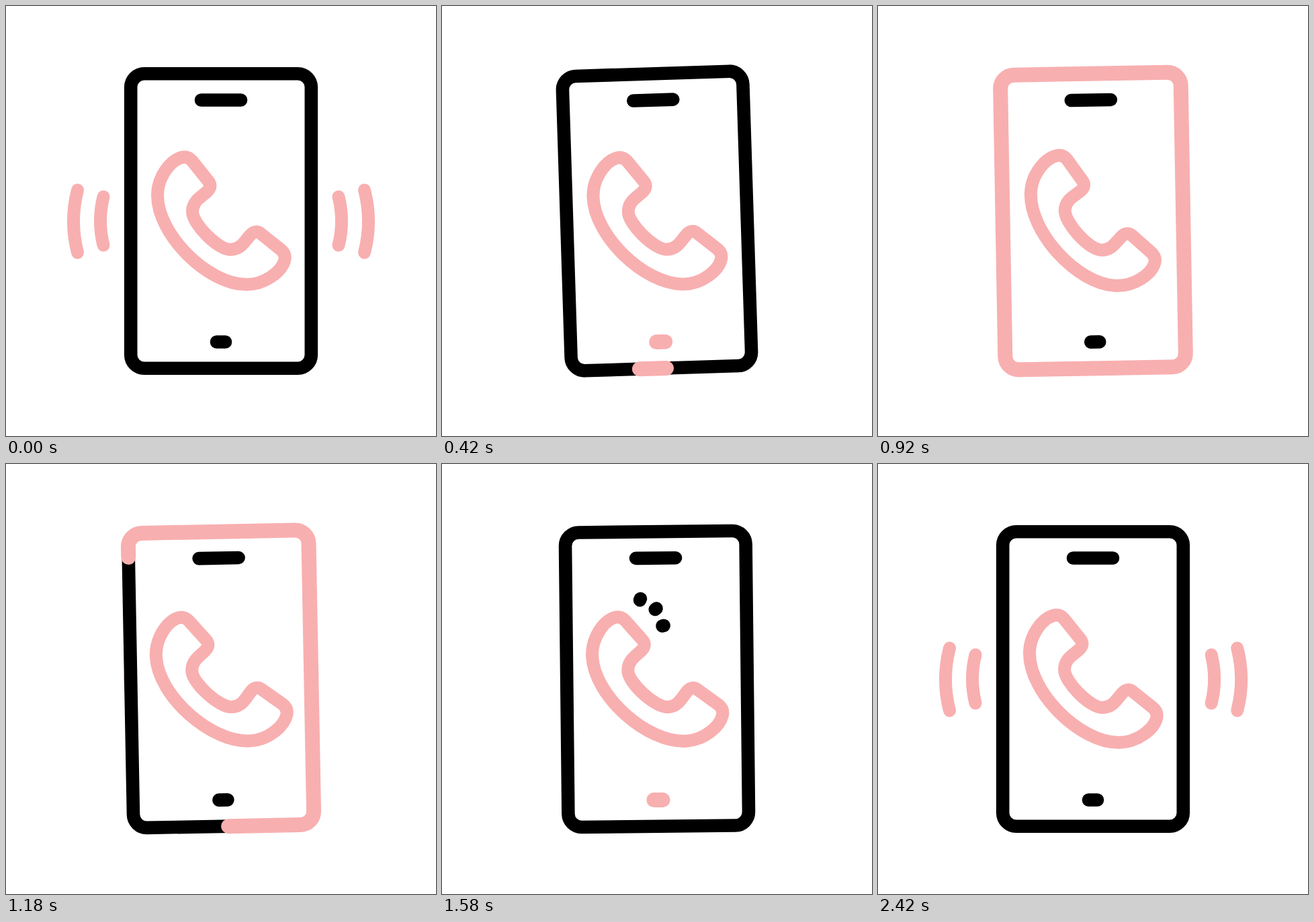
An HTML page that plays this animation: 640 by 640 pixels, repeating every 2600 ms.

```html
<!DOCTYPE html>
<html lang="en">
<head>
<meta charset="utf-8">
<title>Ringing phone</title>
<style>
  html, body { margin: 0; width: 100%; height: 100%; overflow: hidden; background: #fff; }
  svg { display: block; width: 100vw; height: 100vh; }
  path { fill: none; stroke-width: 19.6; stroke-linecap: round; stroke-linejoin: round; }
  .ink path { stroke: #000; }
  .pink path, path.pink { stroke: #f8afb0; }
  .wave, path.pink { stroke-width: 19; }
  path.over { stroke-width: 22; }
</style>
</head>
<body>
<svg viewBox="0 0 640 640">
  <g class="pink">
    <path class="wave" data-side="-1" data-hide="85" d="M106.500 274Q94.500 320.500 106.500 367"/>
    <path class="wave" data-side="-1" data-hide="45" d="M145 284Q136 320 145 356"/>
    <path class="wave" data-side="1" data-hide="85" d="M533.500 274Q545.500 320.500 533.500 367"/>
    <path class="wave" data-side="1" data-hide="45" d="M495 284Q504 320 495 356"/>
  </g>
  <g id="phone" class="ink">
    <path style="fill:#fff" d="M205.700 100.700H434.300a20 20 0 0 1 20 20V519.300a20 20 0 0 1-20 20H205.700a20 20 0 0 1-20-20V120.700a20 20 0 0 1 20-20Z"/>
    <path d="M290.500 140H349.500M313.500 500H326.500"/>
  </g>
  <g id="glow" class="pink">
    <path id="flow" class="over" pathLength="1000" d="M327 539.300H205.700a20 20 0 0 1-20-20V120.700a20 20 0 0 1 20-20H434.300a20 20 0 0 1 20 20V519.300a20 20 0 0 1-20 20H327"/>
    <path id="button" class="over" d="M313.500 500H326.500"/>
  </g>
  <g id="handset">
    <path class="pink" d="M277 230.500L301 260.500Q307.500 268.500 299.500 276C290.500 284.500 277.500 290 277.500 306C277.500 324 315 362.500 334 362.500C350 362.500 355.500 349.500 364 340.500Q371.500 332.500 379.500 339L409.500 363Q417 369.500 414.500 379C410 395 386 414.500 358 414.500C300 414.500 225.500 340 225.500 282C225.500 254 245 230 261 225.500Q270.500 223 277 230.500Z"/>
    <g id="dashes" class="ink"><path/><path/><path/></g>
  </g>
</svg>
<script>
  const LOOP = 2600;
  const $ = id => document.getElementById(id);
  const waves = [...document.querySelectorAll('.wave')];
  const dashes = [...$('dashes').children];

  // x1, y1, x2, y2 of each sound dash, in handset space
  const dashLines = [
    [300.5, 201.5, 310.5, 181],
    [322.5, 216.5, 341, 203],
    [332, 241.5, 353, 238]
  ];
  // time, angle
  const phoneSwing = [[0, 0], [100, -2.4], [280, 2.4], [460, -2.4], [650, 2.4], [850, -2.4],
    [1050, 2.4], [1250, -2.4], [1440, 2.4], [1680, -2.4], [1860, 0]];
  const handsetSwing = [[120, 0], [260, 5], [550, -5], [840, 5], [1110, -5],
    [1390, 5], [1660, -5], [2000, 5], [2140, 0]];

  const part = (t, a, b) => Math.min(1, Math.max(0, (t - a) / (b - a)));
  const ease = (t, a, b) => { const u = part(t, a, b); return u * u * (3 - 2 * u); };
  const mix = (a, b, u) => a + (b - a) * u;
  const within = (t, a, b) => t >= a && t < b;
  const show = (el, on) => { el.style.display = on ? '' : 'none'; };

  function track(keys, t) {
    const i = keys.findIndex(k => k[0] > t);
    if (i === 0) return keys[0][1];
    if (i < 0) return keys[keys.length - 1][1];
    const [t0, a] = keys[i - 1], [t1, b] = keys[i];
    return mix(a, b, ease(t, t0, t1));
  }

  // Outward travel: 0 is behind the phone, 1 at rest, 2 gone
  function waveStep(t) {
    if (t < 400) return 1 + ease(t, 0, 400);
    if (within(t, 480, 900)) return 2 * part(t, 480, 900);
    if (within(t, 1180, 1560)) return 2 * part(t, 1180, 1560);
    if (t >= 1870) return ease(t, 1870, 2300);
    return 2;
  }

  function drawWaves(t) {
    const step = waveStep(t);
    for (const w of waves) {
      const side = +w.dataset.side;
      let out = step < 1 ? -w.dataset.hide * (1 - step) : 60 * (step - 1);
      if (side > 0) out += 1.2 * ease(t, 2100, 2400);
      w.setAttribute('transform', `translate(${side * out} 0)`);
      w.style.opacity = Math.min(1, 2 - step);
      show(w, step < 2);
    }
  }

  function drawFlow(t) {
    const from = 1000 * ease(t, 960, 1480), to = 1000 * ease(t, 368, 888);
    show($('flow'), to > from);
    $('flow').setAttribute('stroke-dasharray', `0 ${from} ${to - from} 2000`);
    show($('button'), within(t, 340, 560) || within(t, 1480, 1700));
  }

  function drawDashes(t) {
    const from = ease(t, 1600, 2080), to = ease(t, 1525, 1805);
    show($('dashes'), within(t, 1550, 2200));
    dashLines.forEach(([x1, y1, x2, y2], i) => {
      const at = u => `${mix(x1, x2, u)} ${mix(y1, y2, u)}`;
      dashes[i].setAttribute('d', `M${at(from)}L${at(to)}`);
    });
  }

  function turn(el, angle) {
    el.setAttribute('transform', `rotate(${angle} 320 320)`);
  }

  function draw(t) {
    const tilt = track(phoneSwing, t);
    turn($('phone'), tilt);
    turn($('glow'), tilt);
    turn($('handset'), track(handsetSwing, t));
    drawWaves(t);
    drawFlow(t);
    drawDashes(t);
  }

  const start = performance.now();
  function tick() {
    draw((performance.now() - start) % LOOP);
    requestAnimationFrame(tick);
  }
  tick();
</script>
</body>
</html>
```
